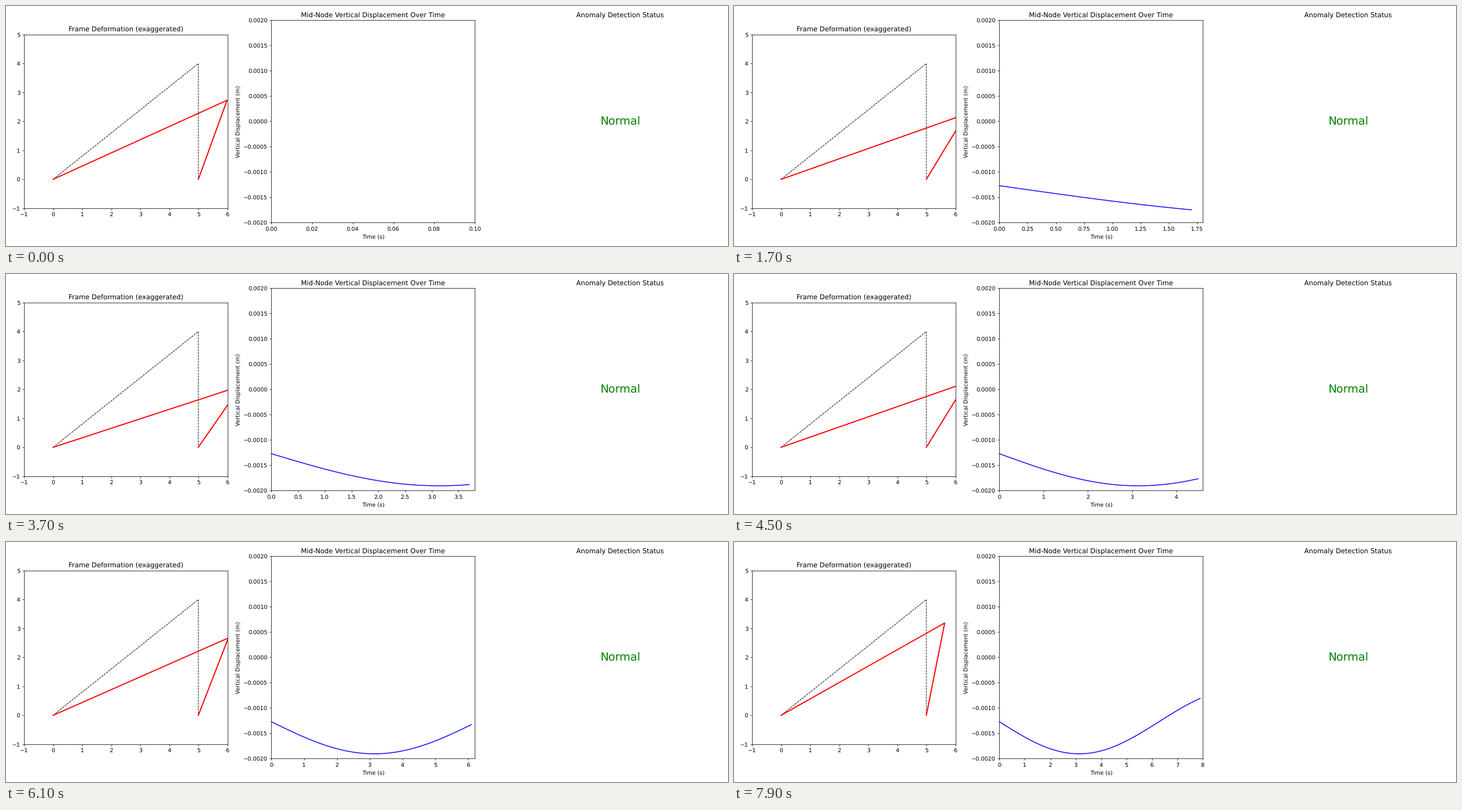
Animation, 1280 px wide and 427 px high, one loop 8000 ms. Source, as a matplotlib script:

```python
import matplotlib.pyplot as plt
import numpy as np
from matplotlib.animation import FuncAnimation

W, H = 1280, 427
DPI = W / 18
FRAMES = 80
STEP = 0.1            # seconds per frame
SCALE = 1000          # exaggeration of the drawn deformation
UX, UY = 0.000988, -0.00127   # static displacement of the loaded node (m)

# panel layout in pixels, measured from the top left
LEFT, RIGHT, TOP, BOTTOM = 32.0, 1269.3, 25.3, 385.4
PANEL = 360.5
GAP = (RIGHT - LEFT - 3 * PANEL) / 2

plt.rcParams["font.family"] = "DejaVu Sans"
plt.rcParams["text.hinting"] = "none"

NODES = np.array([[0, 0], [5, 4], [5, 0]], dtype=float)


def load(t):
    """Slowly oscillating load factor."""
    return 1 + 0.5 * np.sin(0.5 * t)


fig, (ax_frame, ax_disp, ax_status) = plt.subplots(
    1, 3, figsize=(18, 6.00469), dpi=DPI)
fig.subplots_adjust(left=LEFT / W, right=RIGHT / W, wspace=GAP / PANEL,
                    top=1 - TOP / H, bottom=1 - BOTTOM / H)

ax_frame.set_title("Frame Deformation (exaggerated)")
ax_frame.set_xlim(-1, 6)
ax_frame.set_ylim(-1, 5)
ax_frame.set_aspect("equal")
ax_frame.plot(NODES[:, 0], NODES[:, 1], "k--", lw=1)
bent, = ax_frame.plot([], [], "r-", lw=2)

ax_disp.set_title("Mid-Node Vertical Displacement Over Time")
ax_disp.set_xlabel("Time (s)")
ax_disp.set_ylabel("Vertical Displacement (m)")
ax_disp.set_xlim(0, STEP)
ax_disp.set_ylim(-0.002, 0.002)
trace, = ax_disp.plot([], [], "b-", lw=1.5)

ax_status.set_title("Anomaly Detection Status")
ax_status.axis("off")
ax_status.text(0.5, 0.5, "Normal", color="green", fontsize=20,
               ha="center", va="center")


def update(i):
    times = np.arange(i + 1) * STEP
    factor = load(times)

    shape = NODES.copy()
    shape[1] += SCALE * factor[-1] * np.array([UX, UY])
    bent.set_data(shape[:, 0], shape[:, 1])

    trace.set_data(times, UY * factor)
    ax_disp.set_xlim(0, times[-1] + STEP)
    return bent, trace


anim = FuncAnimation(fig, update, frames=FRAMES, interval=100,
                     init_func=lambda: update(0), blit=False,
                     repeat=True, repeat_delay=0)

plt.show()
```
